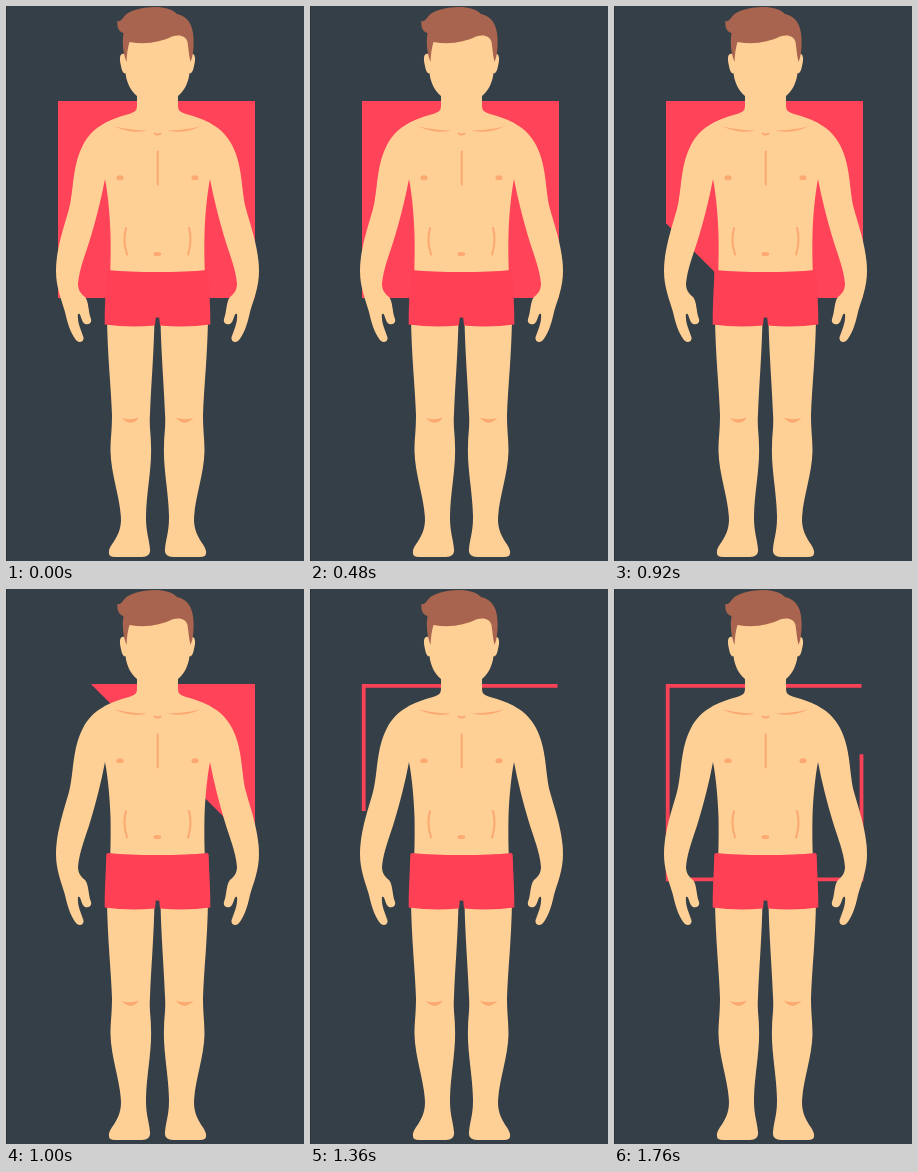
Animation of 298x555 px, one loop 1.8 s. Source, as an HTML page:

```html
<!DOCTYPE html>
<html lang="en">
<head>
<meta charset="utf-8">
<title>Figure with square</title>
<style>
  html, body { margin: 0; width: 100%; height: 100%; overflow: hidden; background: #353f48; }
  svg { display: block; width: 100%; height: 100%; }
  .red { fill: #ff4055; }
  .skin { fill: #ffd096; }
  .mark { fill: #fca871; }
  .crease { fill: none; stroke: #fca871; stroke-width: 2; stroke-linecap: round; }
</style>
</head>
<body>
<svg viewBox="0 0 298 555">
  <defs>
    <clipPath id="square"><rect x="52" y="95" width="197" height="197"/></clipPath>

    <!-- Left half of the body, mirrored for the right -->
    <g id="half">
      <path class="skin" d="M152 20 H130 L118.500 36 V48 C113.500 46 113 53 115 60 C116 66 118 68 119.500 67
        C120.500 77 125 85 131 90 V99 C131 105 129 106 123 108 C104 113 86 121 77 139
        C66 160 68 184 63 203 C58 221 50 243 50 265 C50 282 56 295 59 306
        C62 320 66 330 71 335 C75 338 79 334 77 330 C74 322 71 315 72 308
        C75 306 75 316 79 318 C83 319 86 317 85 313 C82 305 83 296 79 291
        C74 287 72 283 72 278 C73 263 80 247 85 230 C90 213 95 194 99 173
        C102 188 104 211 104.500 228 Q105 250 104 272 H152 Z"/>
      <path class="skin" d="M101 312 C101.500 350 105 380 106 409 C106 425 104.500 432 104.500 445
        C105 470 115 493 115 515 C114 532 104 538 103 545 Q102 551 109 551
        H136 Q145 551 144 543 C143 532 140 526 140 512 C140 488 146 463 145 440
        C145 428 143 420 144 408 C145 380 148 345 148.500 312 Z"/>
      <path class="red" d="M152 266 Q123 266 102 264 Q100.500 264 100.300 266 C100 282 98.500 300 98.700 318.500
        Q123 322 149 319.500 L149.800 311.500 H152 Z"/>
      <path class="mark" d="M115.500 411.800 Q124 415 133 411.500 Q125 422 115.500 411.800 Z"/>
      <path class="mark" d="M108.500 120.500 Q126 124.500 141.500 124.500 Q126 128.500 108.500 120.500 Z"/>
      <ellipse class="mark" cx="114" cy="171.800" rx="3.600" ry="2.500"/>
      <path class="crease" d="M120 222 Q116.500 235 121 248.500"/>
    </g>
  </defs>

  <rect width="298" height="555" fill="#353f48"/>
  <rect width="1" height="555" fill="#293139"/>

  <path id="outline" d="M247.500 96.800 H53.700 V290.300 H247.500 V96.800" pathLength="4"
    fill="none" stroke="#fa4257" stroke-width="3.800"/>
  <polygon id="fill" fill="#ff4459" clip-path="url(#square)"/>

  <use href="#half"/>
  <use href="#half" transform="translate(303) scale(-1 1)"/>
  <path class="crease" d="M151.700 145.500 V178.500"/>
  <path class="crease" d="M148.500 127.500 Q151.500 129.500 154.500 127.500"/>
  <ellipse class="mark" cx="151.300" cy="248" rx="3.800" ry="2"/>

  <path fill="#a8644e" d="M120.500 56 C117 47 116 36 117.500 27 C113 26 110.500 21 111.500 14.500
    C113 16 115 15 117 12 C121 5 134 1 150 1 C158 1 166 3 171 8 C181 10 187 18 187.500 32
    C188 42 187 50 184.500 56 C183 50 182.500 43 181.500 36 C180 30 174 28 166 30.500
    C155 36 140 39 123.500 36 Q121 44 120.500 56 Z"/>
</svg>
<script>
  const LOOP = 1800;
  const WIPE = { start: 835, length: 300 };
  const DRAW = { start: 1042, side: 200 };
  const fill = document.getElementById('fill');
  const outline = document.getElementById('outline');

  const clamp = (v, lo, hi) => Math.min(hi, Math.max(lo, v));
  const ease = p => (1 - Math.cos(Math.PI * p)) / 2;

  function render(now) {
    const t = now % LOOP;

    // The diagonal edge retreats towards the top right corner.
    const leg = 394 * (1 - ease(clamp((t - WIPE.start) / WIPE.length, 0, 1)));
    fill.setAttribute('points', `249,95 ${249 - leg},95 249,${95 + leg}`);

    // Each side of the outline eases in and out separately.
    const sides = clamp((t - DRAW.start) / DRAW.side, 0, 4);
    const drawn = Math.floor(sides) + ease(sides % 1);
    outline.setAttribute('stroke-dasharray', `${drawn} 9`);
    outline.style.visibility = drawn > 0 ? 'visible' : 'hidden';
  }

  const origin = performance.now();
  function tick() {
    render(performance.now() - origin);
    requestAnimationFrame(tick);
  }
  tick();
</script>
</body>
</html>
```
